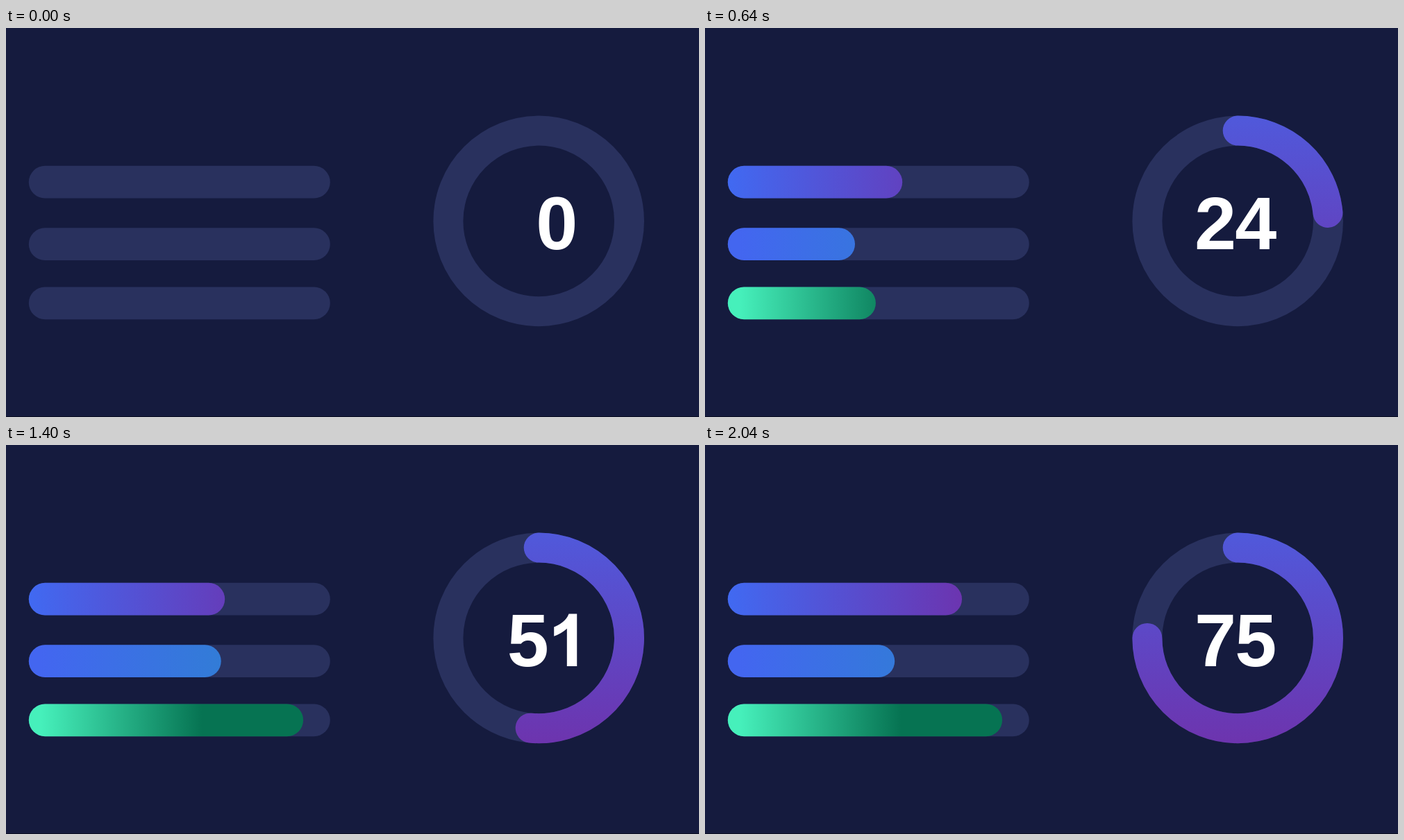
Write an HTML page that moves like this. It is 998 px wide and 561 px high and loops after 2640 ms.

```html
<!DOCTYPE html>
<html lang="en">
<head>
<meta charset="utf-8">
<title>Progress bars</title>
<style>
  html, body { margin: 0; width: 100%; height: 100%; overflow: hidden; background: #151b3e; }
  svg { display: block; width: 998px; height: 561px; }
  .track, .fill { fill: none; stroke-linecap: round; }
  .track { stroke: #29315e; }
  .bar { stroke-width: 46.8; }
  .ring { stroke-width: 43; }
  text { font: bold 108px "Liberation Sans", Arial, sans-serif; text-anchor: middle; }
</style>
</head>
<body>
<svg viewBox="0 0 998 561">
  <defs>
    <linearGradient id="violet" gradientUnits="userSpaceOnUse" x1="36" y1="0" x2="374" y2="0">
      <stop stop-color="#4169f1"/><stop offset="1" stop-color="#6c34af"/>
    </linearGradient>
    <linearGradient id="blue" gradientUnits="userSpaceOnUse" x1="50" y1="0" x2="310" y2="0">
      <stop stop-color="#4366f0"/><stop offset="1" stop-color="#327cd7"/>
    </linearGradient>
    <linearGradient id="green" gradientUnits="userSpaceOnUse" x1="50" y1="0" x2="282" y2="0">
      <stop stop-color="#46f0bb"/><stop offset="1" stop-color="#067352"/>
    </linearGradient>
    <linearGradient id="dial" gradientUnits="userSpaceOnUse" x1="0" y1="127" x2="0" y2="430">
      <stop stop-color="#5059db"/><stop offset="1" stop-color="#6d34ae"/>
    </linearGradient>
    <!-- plain numeral one without a foot, 2048 units per em -->
    <path id="one" transform="scale(.05127 -.05127)"
      d="M806 0H525V1059Q371 915 162 846V1101Q272 1137 401 1237.5T578 1472H806Z"/>
  </defs>
  <rect width="998" height="561" fill="#151b3e"/>
  <rect y="560" width="998" height="1" fill="#0b0e22"/>
  <g id="bars"></g>
  <circle class="track ring" cx="767.2" cy="278.4" r="130.3"/>
  <path id="arc" class="fill ring" stroke="url(#dial)"/>
  <g id="counter" fill="#fff"></g>
</svg>
<script>
const LOOP = 2640, RUN = 2040, STEP = 40;
const LEFT = 56.2, LENGTH = 387.2;
const CENTER = { x: 767.2, y: 278.4, r: 130.3 };
const $ = id => document.getElementById(id);

function add(parent, tag, attrs) {
  const el = document.createElementNS('http://www.w3.org/2000/svg', tag);
  for (const name in attrs) el.setAttribute(name, attrs[name]);
  return parent.appendChild(el);
}

// keys: [time in ms, filled share]
const bars = [
  { y: 222.2, paint: 'violet', keys: [[0, 0], [1000, .75], [1467, .6], [1800, .75]] },
  { y: 311.7, paint: 'blue', keys: [[0, 0], [1000, .5], [1467, .6], [1800, .5]] },
  { y: 396.8, paint: 'green', keys: [[0, 0], [1320, .9]] }
];

for (const bar of bars) {
  add($('bars'), 'path', { class: 'track bar', d: `M${LEFT} ${bar.y}h${LENGTH}` });
  bar.fill = add($('bars'), 'path', { class: 'fill bar', stroke: `url(#${bar.paint})` });
}

const slots = [735, 793.4].map(center => ({
  text: add($('counter'), 'text', { x: center, y: 319 }),
  one: add($('counter'), 'use', { href: '#one', x: center - 29.2, y: 319 })
}));

function eased(keys, t) {
  for (let i = 1; i < keys.length; i++) {
    const [t0, v0] = keys[i - 1], [t1, v1] = keys[i];
    if (t < t1) {
      const s = (t - t0) / (t1 - t0);
      return v0 + (v1 - v0) * s * s * (3 - 2 * s);
    }
  }
  return keys[keys.length - 1][1];
}

function arcPath(share) {
  const { x, y, r } = CENTER, a = share * 2 * Math.PI;
  const large = share > .5 ? 1 : 0;
  return `M${x} ${y - r}A${r} ${r} 0 ${large} 1 ${x + r * Math.sin(a)} ${y - r * Math.cos(a)}`;
}

function showNumber(n) {
  const digits = String(n).padStart(2, ' ');
  slots.forEach(({ text, one }, i) => {
    const isOne = digits[i] === '1';
    text.textContent = isOne ? '' : digits[i].trim();
    one.style.display = isOne ? '' : 'none';
  });
  // a closing one is narrow, so the number sits further right
  $('counter').setAttribute('transform', `translate(${digits[1] === '1' ? 16.7 : 0} 0)`);
}

function draw(ms) {
  const t = Math.min(Math.floor(ms / STEP) * STEP, RUN);
  const share = .75 * t / RUN;
  for (const { fill, y, keys } of bars) {
    fill.setAttribute('d', t ? `M${LEFT} ${y}h${LENGTH * eased(keys, t)}` : '');
  }
  $('arc').setAttribute('d', t ? arcPath(share) : '');
  showNumber(Math.round(share * 100));
}

const start = performance.now();
function tick() {
  draw((performance.now() - start) % LOOP);
  requestAnimationFrame(tick);
}
tick();
</script>
</body>
</html>
```
